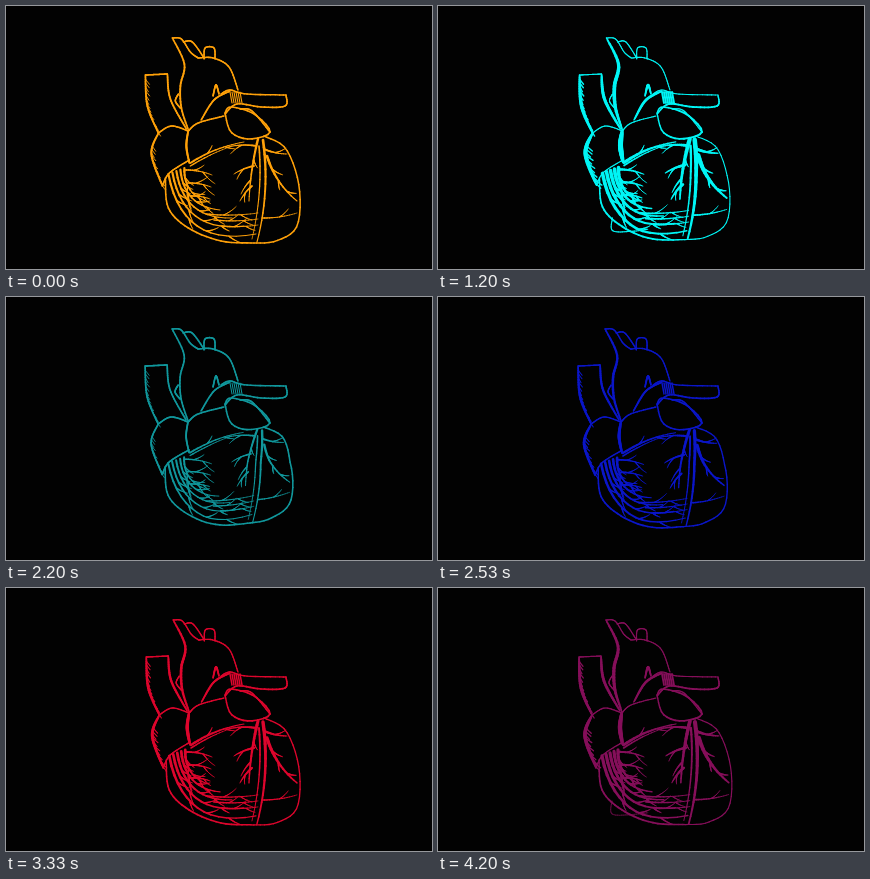
Animation of 426 by 263 pixels, one loop 4.27 s. Source, as an HTML page with a canvas:

```html
<!DOCTYPE html>
<html lang="en">
<head>
<meta charset="utf-8">
<title>Beating heart</title>
<style>
html, body { margin: 0; width: 100%; height: 100%; overflow: hidden; background: #000; }
canvas { display: block; }
</style>
</head>
<body>
<canvas id="stage" width="426" height="263"></canvas>
<script>
const ctx = document.getElementById('stage').getContext('2d');
const LOOP = 4270, STEPS = 64, BEAT = STEPS / 3;

// step, hue, lightness, shading
const looks = [
  [0, 397, 52, .15], [11, 240, 50, .7], [18, 180, 48, 1], [33, 182, 34, .05],
  [44, 302, 50, .9], [56, 396, 39, .1], [63, 322, 29, .8], [64, 397, 52, .15]
];

const mix = (a, b, k) => a + (b - a) * k;
const ramp = (v, from, to) => Math.min(1, Math.max(0, (v - from) / (to - from)));
const random = n => Math.abs(Math.sin(n * 12.9898) * 43758.5453) % 1;

let squeeze, shade, thin;

function setLook(step) {
  const i = looks.findIndex((look, n) => step < looks[n + 1][0]);
  const [from, to] = [looks[i], looks[i + 1]];
  const k = (step - from[0]) / (to[0] - from[0]);
  const [, hue, light, dark] = from.map((v, n) => mix(v, to[n], k));
  shade = dark;
  thin = 1.6 - .5 * shade;
  ctx.strokeStyle = `hsl(${hue % 360} ${mix(80, 100, ramp(light, 35, 48))}% ${light}%)`;
  // Quick squeeze, slower release.
  const d = step % BEAT - 13.33;
  squeeze = Math.exp(-((d / (d < 0 ? 2.6 : 3.7)) ** 2));
}

// The lower right of the heart contracts; shaded drawings lean right.
function place([x, y]) {
  const right = ramp(x, 200, 290);
  return [
    x + 2.5 * shade * ramp(x, 205, 180) - 11 * squeeze * right * ramp(y, 125, 170),
    y - squeeze * ramp(y, 130, 235) * (8 + 16 * right)
  ];
}

// Strokes the path at(u), with the width given by width(u).
function trace(at, width, parts) {
  for (let n = 0; n < parts; n++) {
    ctx.lineWidth = width((n + .5) / parts);
    ctx.beginPath();
    ctx.moveTo(...place(at(n / parts)));
    ctx.lineTo(...place(at((n + 1) / parts)));
    ctx.stroke();
  }
}

function spline(text) {
  const p = text.split(' ').map(pair => pair.split(',').map(Number));
  const last = p.length - 1;
  return u => {
    const i = Math.min(last - 1, Math.floor(u * last)), t = u * last - i;
    const a = p[i], b = p[i + 1], before = p[i - 1] || a, after = p[i + 2] || b;
    return a.map((v, k) => {
      const m = (b[k] - before[k]) / 2, n = (after[k] - v) / 2;
      return v + m * t + (3 * (b[k] - v) - 2 * m - n) * t * t + (2 * (v - b[k]) + m + n) * t ** 3;
    });
  };
}

// A line that swells in the middle when shaded.
function line(text, swell = 0) {
  const path = spline(text);
  trace(path, u => thin + swell * shade * Math.sin(Math.PI * u) ** .6, 28);
  return path;
}

function hatch(path, from, reach) {
  for (let u = from; u < 1; u += .06) {
    const [x, y] = path(u);
    const length = reach * (.6 + .4 * random(u));
    trace(v => [x + length * v, y + 5 * v], () => .8 + .6 * shade, 1);
  }
}

// A bent, tapering vein with side twigs that alternate.
function vein(x, y, toX, toY, bend, width, twigs = 0) {
  const dx = toX - x, dy = toY - y;
  const at = u => {
    const bow = 2 * u * (1 - u) * bend;
    return [x + dx * u - dy * bow, y + dy * u + dx * bow];
  };
  trace(at, u => (thin * .6 + width * (.35 + .65 * shade)) * (1 - .6 * u), 14);
  for (let n = 1; n <= twigs; n++) {
    const u = n / (twigs + 1), [tx, ty] = at(u), [nx, ny] = at(u + .1);
    const angle = Math.atan2(ny - ty, nx - tx) + (n % 2 ? -.6 : .5);
    const length = 9 + 8 * random(x + n);
    vein(tx, ty, tx + length * Math.cos(angle), ty + length * Math.sin(angle), .1, width * .4);
  }
}

function drawVessels() {
  line('166,32 178,58 174,80 175,102 182,124', 2.6);
  line('182,124 180,140 183,157', 4);
  line('166,32 175,33 184,46 192,52');
  line('177,36 186,36 198,52');
  line('198,53 199,42 208,42 209,53');
  line('192,52 207,52 223,61 232,84');
  line('215,88 224,84 240,88 280,89');
  line('280,89 279,100 255,101 231,98 219,108', .8);
  line('224,85 208,94 195,114', 1.5);
  line('207,90 210,79 213,88', 1.2);
  line('182,125 192,117 218,110');
  line('139,69 161,68');
  line('161,68 164,93 180,123', 2);
  line('172,88 169,95 174,102');
  hatch(line('139,69 141,100 152,127', 2.2), .1, 4);
  for (let x = 224; x < 235; x += 2) {
    trace(v => [x + 2 * v, 86 + 11 * v], () => 1 + shade, 1);
  }
}

function drawBody() {
  line('152,127 165,120 182,125');
  hatch(line('152,127 145,148 156,180', 3), .35, 4 + 4 * shade);
  line('156,180 163,167 183,154');
  line('219,107 225,101 248,108 264,126 243,133 225,126 219,107', .8);
  line('234,103 246,105 264,126');
  line('258,130 280,143 293,180 291,220 270,235 248,237');
  line('159,172 162,202 182,222 215,235 248,237', .8);
  ctx.globalAlpha = ramp(shade, .7, .9);
  line('172,213 172,226 190,227 210,225');
  ctx.globalAlpha = 1;
}

function drawVeins() {
  for (let i = 0; i < 5; i++) {
    vein(162 + 4 * i, 168 - 1.5 * i, 250 - 12 * i, 228 - 8 * i, .5 - .03 * i, 3, 4);
  }
  for (let i = 0; i < 3; i++) {
    vein(178 + 3 * i, 164 + 13 * i, 206 - i, 169 + 12 * i, -.1, 1.8, 2);
    vein(250 - 2 * i, 140 + 20 * i, 222 + 6 * i, 141 + 27 * i, .1, 2.2, 1);
    vein(200 + 8 * i, 208 + 6 * i, 252, 207 + 6 * i, .06, 1.4, 2);
  }
  vein(184, 157, 238, 136, -.1, 2.5, 2);
  vein(184, 160, 226, 140, -.05, 1.2);
  vein(252, 133, 243, 195, .05, 3.5, 2);
  vein(257, 134, 251, 236, -.1, 4);
  vein(253, 140, 246, 233, -.08, 1.8);
  vein(258, 143, 281, 148, .1, 2.5, 1);
  vein(261, 150, 291, 195, .15, 4, 3);
  vein(256, 212, 291, 207, .08, 1.2, 1);
}

function render(step) {
  ctx.fillStyle = '#020202';
  ctx.fillRect(0, 0, 426, 263);
  ctx.lineCap = 'round';
  setLook(step);
  drawVessels();
  drawBody();
  drawVeins();
}

const start = performance.now();
function tick() {
  const t = (performance.now() - start) % LOOP;
  render(Math.floor(t / LOOP * STEPS + .1) % STEPS);
  requestAnimationFrame(tick);
}
tick();
</script>
</body>
</html>
```
